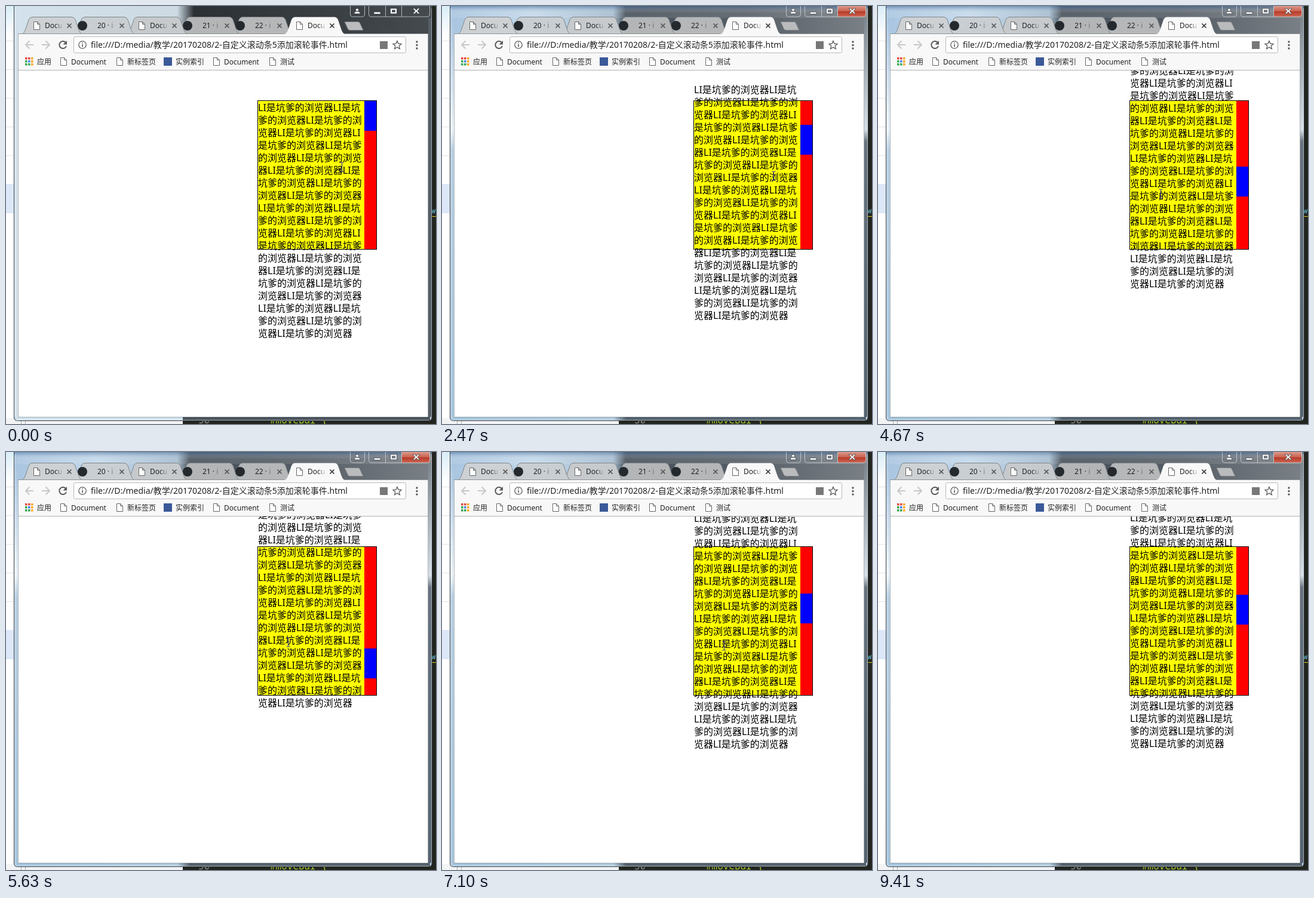
Write an HTML page that moves like this. It is 720 px wide and 700 px high and loops after 9840 ms.

```html
<!DOCTYPE html>
<html lang="zh-CN">
<head>
<meta charset="utf-8">
<title>Document</title>
<style>
html, body { margin: 0; width: 100%; height: 100%; overflow: hidden; background: #fff; }
svg { display: block; width: 720px; height: 700px; }
text { font: 12px "Noto Sans", "Noto Sans CJK SC", "Noto Sans CJK", sans-serif; fill: #222; white-space: pre; }
.url { font-size: 14px; }
#lines text { font-size: 16px; fill: #000; }
.code { font: 16px "Noto Sans Mono", monospace; }
.ink { fill: none; stroke: #5a5a5a; stroke-width: 1.6; }
.pale { stroke: #c8c8c8; stroke-width: 2; }
</style>
</head>
<body>
<svg viewBox="0 0 720 700">
  <defs>
    <linearGradient id="sky" x2="0" y2="1"><stop stop-color="#d9edf8"/><stop offset="1" stop-color="#fff"/></linearGradient>
    <linearGradient id="barOn">
      <stop stop-color="#a9c5e0"/><stop offset=".2" stop-color="#c3d8ea"/><stop offset=".39" stop-color="#a5bccf"/>
      <stop offset=".42" stop-color="#46505a"/><stop offset=".7" stop-color="#555d65"/><stop offset="1" stop-color="#7a8086"/>
    </linearGradient>
    <linearGradient id="barOff">
      <stop stop-color="#d3e2ec"/><stop offset=".39" stop-color="#cddae3"/>
      <stop offset=".43" stop-color="#2b3035"/><stop offset="1" stop-color="#454a4f"/>
    </linearGradient>
    <linearGradient id="shine" x2="0" y2="1"><stop stop-color="#3d6797" stop-opacity=".55"/><stop offset=".6" stop-color="#fff" stop-opacity=".1"/></linearGradient>
    <linearGradient id="leftOn" x2="0" y2="1">
      <stop stop-color="#a9c5e0"/><stop offset=".28" stop-color="#edf4fa"/><stop offset=".33" stop-color="#b9cfe2"/><stop offset="1" stop-color="#a6c6de"/>
    </linearGradient>
    <linearGradient id="rightOn" x2="0" y2="1">
      <stop stop-color="#7c868f"/><stop offset=".28" stop-color="#d5dee6"/><stop offset=".31" stop-color="#66737e"/><stop offset="1" stop-color="#55636f"/>
    </linearGradient>
    <linearGradient id="footOn">
      <stop stop-color="#a6c6de"/><stop offset=".39" stop-color="#b4cddf"/><stop offset=".42" stop-color="#53606b"/><stop offset="1" stop-color="#55636f"/>
    </linearGradient>
    <linearGradient id="red" x2="0" y2="1">
      <stop stop-color="#dc9a8c"/><stop offset=".48" stop-color="#c9604f"/><stop offset=".5" stop-color="#b43a28"/><stop offset="1" stop-color="#cf6450"/>
    </linearGradient>
    <linearGradient id="fade" gradientUnits="userSpaceOnUse" x1="56" x2="70"><stop stop-color="#fff"/><stop offset="1" stop-color="#000"/></linearGradient>
    <mask id="trim" maskUnits="userSpaceOnUse" x="0" y="0" width="110" height="60"><rect width="110" height="60" fill="url(#fade)"/></mask>
    <clipPath id="page"><rect x="20" y="108" width="687" height="580"/></clipPath>
    <path id="file" d="M.5.5h6l4 4v9h-10zM6.5.5v4h4" fill="#fff" stroke="#666"/>
    <path id="tabShape" d="M0 47C4 46 5 43 7 38L12 23Q14 18.5 18 18.5H84Q88 18.5 90 23L95 38C97 43 98 46 102 47Z"/>
  </defs>

  <!-- desktop behind the window -->
  <rect width="720" height="700" fill="#fff"/>
  <rect width="14" height="50" fill="url(#sky)"/>
  <path d="M0 58.5h14M0 106.5h14M0 154.5h14M0 202.5h14M0 250.5h14" stroke="#dfe3e8"/>
  <rect y="298" width="14" height="49" fill="#dce7f8"/>
  <rect y="690" width="296" height="10" fill="#f1f3f5"/>
  <path d="M25.5 695v5M32.5 695v5" stroke="#aaa"/>
  <path d="M296 690H712V0h8V700H296z" fill="#22241f"/>
  <text class="code" x="322" y="699" style="fill:#8f908a">50</text>
  <text class="code" x="442" y="699" style="fill:#a6d22e">#moveBar {</text>
  <text class="code" x="712" y="347" style="fill:#66c8e0;font-size:12px">w</text>
  <path d="M713 352.5h7" stroke="#d8d020"/>

  <!-- window frame -->
  <path d="M13.5 0V689q0 5.500 6 5.500H707q6 0 6-5.500V0z" fill="#c0d3e3" stroke="#333c44"/>
  <g id="active">
    <rect x="14" width="699" height="48" fill="url(#barOn)"/>
    <rect x="14" width="699" height="20" fill="url(#shine)"/>
    <rect x="14" y="20" width="6" height="668" fill="url(#leftOn)"/>
    <rect x="707" y="20" width="6" height="668" fill="url(#rightOn)"/>
    <rect x="17" y="688" width="693" height="6" fill="url(#footOn)"/>
    <path d="M663 0h47v14q0 4-4 4H663z" fill="url(#red)"/>
  </g>
  <g id="idle">
    <rect x="14" width="699" height="48" fill="url(#barOff)"/>
    <rect x="14" y="20" width="6" height="668" fill="#d3e2ec"/>
    <rect x="707" y="20" width="6" height="668" fill="#555e66"/>
    <rect x="17" y="688" width="279" height="6" fill="#d3e2ec"/>
    <rect x="296" y="688" width="414" height="6" fill="#4a525a"/>
  </g>
  <path d="M14.500 4V688M712.500 4V688M18 693.500H708" stroke="#fff" stroke-opacity=".45"/>
  <g fill="none" stroke="#d5dbe0" stroke-opacity=".75">
    <path d="M576.500 0v14q0 4 4 4h16q4 0 4-4V0M607.500 0v14q0 4 4 4h94q4 0 4-4V0M635.500 0v18M662.500 0v18"/>
  </g>
  <g fill="#fff" stroke="#3b4248" stroke-width=".8">
    <circle cx="588" cy="6.500" r="2.500"/><path d="M583 13q0-4 5-4t5 4z"/>
    <rect x="616" y="10" width="11" height="3.500"/>
    <path fill-rule="evenodd" d="M643.500 4h11v9h-11zM646.500 7v3h5v-3z"/>
    <path d="M681 4h3.500l2.500 3 2.500-3h3.500l-4 4.500 4 4.500h-3.500l-2.500-3-2.500 3H681l4-4.500z"/>
  </g>

  <g id="tabs"></g>
  <path d="M569 26.500h20q3 0 4 3l5 11h-22q-3 0-4-3l-5-11z" fill="#b9bbbc" stroke="#7d8184"/>

  <!-- toolbar -->
  <rect x="20" y="47" width="687" height="61" fill="#f8f8f8"/>
  <use href="#tabShape" x="466" fill="#f8f8f8"/>
  <path d="M20 46.500H466M567 46.500H707" stroke="#8e9296"/>
  <g id="front"></g>
  <path class="ink pale" d="M46 65H33M39.500 58.500L33 65l6.500 6.500M60 65H73M66.500 58.500L73 65l-6.500 6.500"/>
  <path class="ink" style="stroke-width:2" d="M100.500 62A6 6 0 1 0 101 67"/>
  <path d="M102 58v6.500h-6.500z" fill="#5a5a5a"/>
  <rect x="113.500" y="51.500" width="556" height="27" rx="2" fill="#fff" stroke="#b8b8b8"/>
  <circle class="ink" style="stroke-width:1.300" cx="128" cy="65" r="6.200"/>
  <path class="ink" d="M128 64v4.500M128 61v1.600"/>
  <text class="url" x="142" y="70">file:///D:/media/教学/20170208/2-自定义滚动条5添加滚轮事件.html</text>
  <rect x="626" y="59" width="13" height="13" fill="#777"/>
  <path class="ink" style="stroke-width:1.300" d="M655 58.500l2 4.600 5 .4-3.800 3.300 1.200 4.900-4.400-2.600-4.400 2.600 1.200-4.900-3.800-3.300 5-.4z"/>
  <g fill="#5a5a5a"><circle cx="688" cy="60" r="1.700"/><circle cx="688" cy="65.500" r="1.700"/><circle cx="688" cy="71" r="1.700"/></g>
  <g id="marks"></g>
  <rect x="264" y="86" width="14" height="14" fill="#3b5998"/>
  <rect x="20" y="107" width="687" height="581" fill="#fff"/>
  <path d="M20 107.500H707" stroke="#b4b4b4"/>
  <path d="M20.500 47V688.500H706.500V47" fill="none" stroke="#7b858d" stroke-opacity=".6"/>

  <!-- page -->
  <g clip-path="url(#page)">
    <rect x="421.500" y="158.500" width="199" height="249" fill="#ff0" stroke="#000"/>
    <rect x="600" y="159" width="20" height="248" fill="#f00"/>
    <rect id="thumb" x="600" y="159" width="20" height="50" fill="#00f"/>
    <g id="lines"></g>
    <path id="beam" d="M-3-7.500h2.500q.5 0 .5 1V6.500q0 1-.5 1H-3M3-7.500H.500M3 7.500H.500" fill="none" stroke="#1c1cb4"/>
    <path id="arrow" d="M.500.500V16l3.700-3.400 2.500 5.800 2.300-1-2.500-5.600h5z" fill="#fff" stroke="#000"/>
  </g>
</svg>
<script>
const LOOP = 9840;
const $ = id => document.getElementById(id);
const fill = (id, parts) => { $(id).innerHTML = parts.join(""); };
const label = (x, y, s) => `<text x="${x}" y="${y}">${s}</text>`;

// tabs
const titles = ["Docu", "20 · i", "Docu", "21 · i", "22 · i", "Docu"];
const tabInner = (s, i) => `<g transform="translate(${26 + 88 * i})">
  ${s === "Docu" ? '<use href="#file" x="20" y="26"/>' : '<circle cx="114" cy="33" r="8" fill="#24292e" transform="translate(-100)"/>'}
  <g mask="url(#trim)">${label(39, 37, s)}</g>
  <path d="M76.500 29.500l7 7m0-7l-7 7" stroke="${i === 5 ? "#333" : "#555"}" stroke-width="1.700"/></g>`;
const shades = ["#cdd1d4", "#c9ced2", "#c6cacd", "#b3b5b7", "#b5b7b9"];
fill("tabs", shades.map((c, i) => ({ c, i })).reverse().map(({ c, i }) =>
  `<use href="#tabShape" x="${26 + 88 * i}" fill="${c}" stroke="#80868a"/>` + tabInner(titles[i], i)));
fill("front", [tabInner(titles[5], 5)]);

// bookmarks
const dots = ["#e8453c", "#e8453c", "#f9a825", "#34a853", "#4285f4", "#f9a825", "#34a853", "#34a853", "#f9a825"];
const marks = [[52, "应用"], [109, "Document"], [203, "新标签页"], [284, "实例索引"], [365, "Document"], [459, "测试"]];
fill("marks", [
  ...dots.map((c, i) => `<rect x="${32 + i % 3 * 5}" y="${86 + (i / 3 | 0) * 5}" width="3.500" height="3.500" fill="${c}"/>`),
  ...[91, 185, 347, 441].map(x => `<use href="#file" x="${x}" y="86"/>`),
  ...marks.map(([x, s]) => label(x, 98, s))
]);

// scrolled text, eleven glyph groups per line
const unit = ["LI", ..."是坑爹的浏览器"];
const glyphs = Array.from({ length: 208 }, (_, i) => unit[i % 8]);
fill("lines", Array.from({ length: 19 }, (_, i) =>
  label(422, 176 + 21 * i, glyphs.slice(11 * i, 11 * i + 11).join(""))));

// time, thumb offset, pointer x, pointer y
const steps = [
  [0, 0, 562, 269], [960, 0, 560, 276], [1110, 10, 557, 282], [1230, 20, 557, 282], [1350, 30, 557, 282],
  [2470, 40, 555, 284], [2620, 50, 550, 290], [3020, 60, 545, 294], [3170, 70, 543, 296], [3320, 70, 514, 302],
  [3470, 70, 490, 308], [3590, 70, 473, 312], [3710, 80, 473, 313], [3830, 90, 473, 313],
  [4670, 110, 473, 314], [5230, 140, 472, 316], [5630, 170, 472, 318], [5910, 190, 472, 319], [6030, 198, 472, 319],
  [6460, 168, 472, 319], [6580, 148, 472, 320], [6860, 128, 472, 322], [6980, 98, 472, 323], [7100, 78, 472, 324],
  [7220, 58, 472, 325], [7530, 18, 472, 326], [7840, 0, 472, 326], [8560, 40, 472, 326], [8860, 80, 472, 326]
];
const flight = [[9140, 548, 480], [9260, 624, 643]];
const at = (list, t) => list.filter(s => s[0] <= t).pop();
const move = (id, x, y) => $(id).setAttribute("transform", `translate(${x} ${y})`);
const show = (id, on) => { $(id).style.display = on ? "" : "none"; };

function draw(t) {
  const [, scroll, x, y] = at(steps, t);
  const fly = at(flight, t);
  move("thumb", 0, scroll);
  move("lines", 0, -Math.round(scroll * 0.75));
  move("beam", x + 0.5, y + 0.5);
  if (fly) move("arrow", fly[1], fly[2]);
  show("beam", !fly);
  show("arrow", fly && t < 9410);
  show("idle", t < 150);
  show("active", t >= 150);
}
const start = performance.now();
function tick() {
  draw((performance.now() - start) % LOOP);
  requestAnimationFrame(tick);
}
tick();
</script>
</body>
</html>
```
